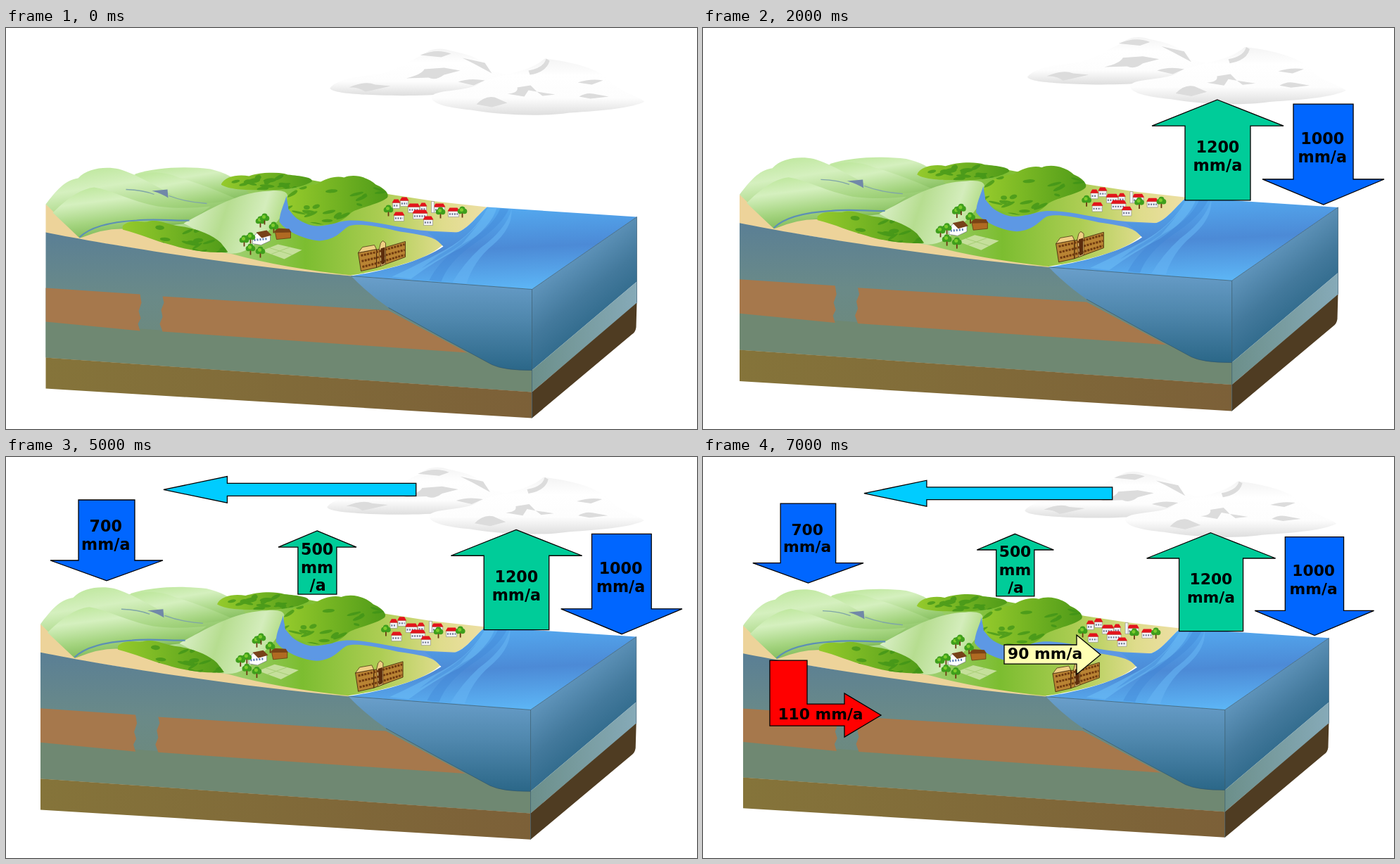
Recreate the animation shown at these times as an HTML page. Size 982 by 570 pixels, loop 8000 ms.

```html
<!DOCTYPE html>
<html lang="en">
<head>
<meta charset="utf-8">
<title>Water balance</title>
<style>
  html, body { margin: 0; width: 100%; height: 100%; overflow: hidden; background: #fff; }
  svg { display: block; width: 982px; height: 570px; }
  text { font: bold 22px Verdana, "DejaVu Sans", sans-serif; text-anchor: middle; }
  .arrow path { stroke: #000; stroke-width: 1.3; }
</style>
</head>
<body>
<svg viewBox="0 0 982 570">
<defs>
  <linearGradient id="slate" x2="0" y2="1"><stop stop-color="#5a7f95"/><stop offset=".4" stop-color="#6a8a88"/><stop offset="1" stop-color="#6f8872"/></linearGradient>
  <linearGradient id="base"><stop stop-color="#85743a"/><stop offset="1" stop-color="#7c6038"/></linearGradient>
  <linearGradient id="depth" x2="0" y2="1"><stop stop-color="#6a9fcb"/><stop offset=".45" stop-color="#5088ae"/><stop offset="1" stop-color="#2b6788"/></linearGradient>
  <linearGradient id="side" x1=".3" y1=".2" x2=".65" y2=".85"><stop stop-color="#6a9ec6"/><stop offset=".5" stop-color="#43799c"/><stop offset="1" stop-color="#236080"/></linearGradient>
  <linearGradient id="shelf"><stop stop-color="#6c8f8a"/><stop offset="1" stop-color="#86aab8"/></linearGradient>
  <linearGradient id="sea" x1=".45" x2=".6" y2="1"><stop stop-color="#54aaf0"/><stop offset=".5" stop-color="#4c8ad6"/><stop offset="1" stop-color="#5db6f6"/></linearGradient>
  <linearGradient id="plain"><stop stop-color="#b2dc98"/><stop offset=".2" stop-color="#9fd072"/><stop offset=".43" stop-color="#7cbd30"/><stop offset=".67" stop-color="#accd53"/><stop offset=".86" stop-color="#dfdc8c"/><stop offset="1" stop-color="#eedfa5"/></linearGradient>
  <linearGradient id="hill" x1=".25" x2=".65" y2="1"><stop stop-color="#c0e8a0"/><stop offset=".25" stop-color="#d5f0bf"/><stop offset=".6" stop-color="#a4d47f"/><stop offset="1" stop-color="#70ae48"/></linearGradient>
  <linearGradient id="slope" y2=".2"><stop stop-color="#e4f4d6"/><stop offset=".45" stop-color="#b6dd90"/><stop offset=".8" stop-color="#d4edbc"/><stop offset="1" stop-color="#b2dc86"/></linearGradient>
  <linearGradient id="wood"><stop stop-color="#96cb2c"/><stop offset="1" stop-color="#4e9a18"/></linearGradient>
  <linearGradient id="cloud" x2="0" y2="1"><stop stop-color="#f4f4f4"/><stop offset=".3" stop-color="#fff"/><stop offset=".7" stop-color="#fdfdfd"/><stop offset="1" stop-color="#dedede"/></linearGradient>
  <clipPath id="clip0"><path d="M165 281C175 271 190 276 200 275 215 270 230 279 245 281 265 283 292 292 305 305L315 318C290 320 260 316 235 308 210 302 190 292 165 286Z"/></clipPath>
  <clipPath id="clip1"><path d="M305 222C310 210 330 207 345 210 360 205 385 203 400 208 420 210 437 212 434 218 420 226 400 230 360 230 340 230 315 229 305 222Z"/></clipPath>
  <clipPath id="clip2"><path d="M399 240C405 230 425 222 440 222 455 212 470 209 480 212 495 206 515 212 525 222 535 226 546 235 541 241 530 250 500 255 490 262 480 272 468 280 450 279 430 278 408 268 401 257Z"/></clipPath>
</defs>
<g id="scene">
  <!-- clouds -->
  <path fill="url(#cloud)" d="M460 85C470 72 500 68 530 65 558 58 572 46 590 39 602 28 618 27 632 32 652 36 672 41 680 52 690 65 715 64 720 68L700 82C650 95 580 97 530 95 500 94 462 92 460 85Z"/>
  <path fill="url(#cloud)" d="M604 98C606 87 650 90 670 80 690 65 740 66 765 43 800 47 842 56 860 76 870 90 900 97 907 104 890 113 850 117 800 120 760 126 700 123 660 116 630 113 605 108 604 98Z"/>
  <path fill="#dcdcdc" d="M487 84Q510 74 524 80L546 82Q525 87 510 90 500 83 487 84ZM568 71Q590 66 594 58L622 56 645 60 622 66Q610 75 600 70ZM588 38Q612 28 632 36L618 41ZM642 76Q658 70 680 74L664 81ZM648 42L680 49 690 64 664 50ZM668 108Q680 95 694 98L712 106 690 112ZM712 93Q728 92 726 84L745 81 754 90 742 88 736 97ZM742 60Q764 56 767 43L772 46Q768 62 744 66ZM812 77Q830 71 848 74L832 80ZM814 97Q824 91 834 93L856 97 830 100ZM754 90L780 94 762 96Z"/>

  <!-- land -->
  <path fill="#edd39a" d="M56 250L104 290 250 270 490 350V353L330 336 103 300 56 291Z"/>
  <path fill="url(#plain)" d="M270 240L430 215 545 236 610 246 683 254C665 270 655 287 637 291L600 290 620 308C600 326 560 340 490 351 430 349 360 335 300 318L230 290Z"/>
  <g fill="url(#hill)">
    <path d="M183 207C215 197 255 196 290 200 315 206 330 215 345 235L330 262H200Z"/>
    <path d="M178 209C200 203 225 203 245 212 280 222 310 235 328 243L300 275 190 265Z"/>
    <path d="M56 250C70 232 82 216 102 213 115 199 140 196 160 200 185 207 215 226 255 247 282 250 300 248 320 244L265 276 104 297Z"/>
    <path d="M66 262C85 243 105 228 125 226 150 230 178 246 215 253 245 257 270 255 290 253L258 276 185 278 104 298Z"/>
  </g>
  <path fill="url(#slope)" d="M252 277C290 257 330 232 375 231 395 229 402 234 399 241 398 260 388 274 365 295 350 312 335 322 315 320L285 295Z"/>
  <path fill="none" stroke="#5d8fb5" stroke-width="2.2" d="M104 297C120 281 150 275 185 273 215 270 237 274 260 273"/>
  <path fill="none" stroke="#7fa5a8" stroke-width="1.3" d="M170 229Q195 230 210 236M231 238Q255 247 285 249"/>
  <path fill="#7188a8" d="M207 231L229 229 230 241Q221 235 207 231Z"/>
  <path fill="#edd39a" d="M108 297Q140 284 166 285L235 307 322 321Q390 340 490 351L420 347 330 336 200 316Z"/>
  <path fill="#5d98e4" d="M398 238C400 260 408 270 425 277 445 287 465 275 487 273 520 272 560 285 600 288L642 290 620 309C610 297 600 295 560 289 530 282 500 276 487 281 475 288 470 300 445 302 420 300 395 286 388 275 388 262 395 250 398 238Z"/>
  <g id="woods"></g>
  <path fill="#c5df9b" d="M363 316L386 307 420 315 395 328Z"/>
  <path fill="none" stroke="#a9cf78" d="M374 312L406 322M376 321L403 311"/>

  <!-- sea and block -->
  <path fill="url(#sea)" d="M490 352C540 344 590 331 621 310 608 296 600 292 598 289L637 291C655 287 665 270 683 254L896 268 747 371Z"/>
  <path fill="#6cbcf7" opacity=".6" d="M684 255Q665 292 625 314T548 353L575 356Q610 330 646 312 690 282 697 255Z"/>
  <path fill="#3f86d4" opacity=".4" d="M702 256Q690 285 650 306 615 330 601 358L618 360Q628 332 665 306 704 280 714 257ZM676 272Q650 303 615 322L590 341Q620 325 647 307Z"/>
  <path fill="#66b5f3" opacity=".6" d="M718 257Q710 286 674 312 650 334 634 361L654 363Q664 331 690 309 720 284 718 257Z"/>
  <path fill="url(#slate)" d="M56 290C140 307 330 338 490 352L747 371V517L56 468Z"/>
  <path fill="#6f8872" d="M56 417L655 461 747 470V517L56 468Z"/>
  <path fill="#a6784c" d="M56 369L190 378 192 390 188 402 191 412 187 420 190 430 56 417ZM222 381L543 401 655 461 222 431 218 420 222 410 220 400 224 390Z"/>
  <path fill="url(#depth)" d="M490 352L747 371V486C725 486 706 485 690 478L620 440 543 397Q515 378 490 352Z"/>
  <path fill="url(#base)" d="M56 468L747 517V554L56 512Z"/>
  <path fill="url(#side)" d="M747 371L896 268V360L747 486Z"/>
  <path fill="url(#shelf)" d="M747 486L896 360V391L747 517Z"/>
  <path fill="#4f3c22" d="M747 517L896 390 895 425Q894 432 889 435L747 554Z"/>
  <path fill="none" stroke="#2f5368" stroke-width=".8" opacity=".8" d="M490 352L747 371 896 268V390M747 371V554M543 397L620 440 690 478Q706 486 747 486"/>

  <g id="buildings"></g>
  <path fill="#b98333" stroke="#3e2108" stroke-width=".8" d="M500 319L526 314V340L504 345ZM526 315L567 303V325L526 340Z"/>
  <path fill="#efcf83" stroke="#3e2108" stroke-width=".7" d="M500 319L506 311 523 308 526 314ZM530 313L532 305 535 302 539 305V335L532 338Z"/>
  <path fill="none" stroke="#713b10" stroke-width="3" stroke-dasharray="3 1.4" d="M504 323L526 318 566 307M505 331L526 326 566 315M506 339L526 334 566 322"/>
  <path fill="#5c2d0d" d="M532 313L538 311V334L533 336Z"/>

  <g id="arrows"></g>
</g>
</svg>
<script>
const $ = id => document.getElementById(id);

let seed = 7;
const random = () => (seed = seed * 16807 % 2147483647) / 2147483647;
const between = (low, high) => low + random() * (high - low);

// Woods: a lit canopy with darker leaf strokes, clipped to its outline
function wood(clip, x, y, w, h, count) {
  let leaves = "";
  for (let i = 0; i < count; i++) {
    const cx = between(x, x + w), cy = between(y + h * .2, y + h);
    leaves += `<ellipse cx="${cx}" cy="${cy}" rx="${between(4, 11)}" ry="${between(1.5, 3.5)}" transform="rotate(${between(-35, 20)} ${cx} ${cy})"/>`;
  }
  return `<g clip-path="url(#clip${clip})"><rect x="${x}" y="${y}" width="${w}" height="${h}" fill="url(#wood)"/><g fill="#3c9217" opacity=".7">${leaves}</g></g>`;
}
$("woods").innerHTML = wood(1, 304, 203, 132, 28, 20) + wood(2, 396, 207, 148, 73, 32) + wood(0, 163, 270, 154, 50, 26);

const tree = ([x, y]) => `<path d="M${x} ${y}v9" stroke="#6b3a12" stroke-width="1.8"/>
  <g fill="#3f9f1c"><circle cx="${x - 3}" cy="${y}" r="3.8"/><circle cx="${x + 3}" cy="${y}" r="3.8"/><circle cx="${x}" cy="${y - 3}" r="4"/></g>
  <circle cx="${x - 1}" cy="${y - 2}" r="2.5" fill="#7ccc2c"/>`;

const house = ([x, y, w]) => `<path fill="#f4f4f8" stroke="#777" stroke-width=".5" d="M${x} ${y}h${w}v8h${-w}z"/>
  <path fill="#e3141c" d="M${x - 1} ${y}l3-5h${w - 4}l3 5z"/>
  <path stroke="#66708c" stroke-width="2.4" stroke-dasharray="1.8 1.7" d="M${x + 1.5} ${y + 4}h${w - 3}"/>`;

$("buildings").innerHTML =
  [[560, 245, 11], [549, 248, 10], [571, 254, 16], [588, 253, 9], [608, 254, 15], [551, 266, 14], [578, 263, 20], [628, 260, 15], [593, 272, 13]].map(house).join("") +
  `<path fill="#f4f4f8" stroke="#777" stroke-width=".5" d="M604 246h4v16h-4z"/>
   <path fill="#fff" stroke="#667" stroke-width=".6" d="M350 297L357 290 375 293V302L362 308 350 306Z"/>
   <path fill="#77421a" d="M355 290L370 287 377 294 363 298Z"/>
   <path stroke="#5878b0" stroke-width="3" stroke-dasharray="2 2" d="M352 301L372 299"/>
   <path fill="#b06a22" stroke="#5b300c" stroke-width=".7" d="M382 290L404 289V298L384 300Z"/>
   <path fill="#7a4315" d="M380 290L385 284 402 285 405 290Z"/>` +
  [[543, 258], [617, 261], [648, 260], [361, 274], [367, 270], [380, 282], [347, 297], [338, 301], [347, 313], [361, 317]].map(tree).join("");

// Each arrow: start time, fill, outline, then lines of text as [words, x, baseline]
const green = "#00cc99", blue = "#0066ff";
const arrows = [
  [1000, green, "M726.6 117L819.5 153.6H773V258.2H681.2V153.6H634.8Z", ["1200", 727, 191], ["mm/a", 727, 217]],
  [2000, blue, "M833.3 123H917.3V228.6H960.7L875.5 264.2 789.8 228.6H833.3Z", ["1000", 874, 179], ["mm/a", 874, 205]],
  [3000, "#00ccff", "M229.5 60.5L319.3 41.8V51.6H585.5V69.4H319.3V79.1Z"],
  [4000, blue, "M109.6 75H188.9V160.3H228.6L149.3 189 69.9 160.3H109.6Z", ["700", 148, 120], ["mm/a", 148, 145]],
  [5000, green, "M446 118.6L501.4 141.5H473.6V208H419V141.5H391.3Z", ["500", 446, 152], ["mm", 446, 178], ["/a", 447, 203]],
  [6000, "#ffffb3", "M430.4 277.7H534.3V263.6L568.6 291.8 534.3 320V305H430.4Z", ["90 mm/a", 489, 298]],
  [7000, "#ff0000", "M94.3 300H147.8V362.5H201.3V347.3L253.8 378.6 201.3 410V393.8H94.3Z", ["110 mm/a", 167, 385]]
];
$("arrows").innerHTML = arrows.map(([, fill, outline, ...lines]) =>
  `<g class="arrow"><path fill="${fill}" d="${outline}"/>${lines.map(([words, x, y]) => `<text x="${x}" y="${y}">${words}</text>`).join("")}</g>`).join("");

// Where the block's left edge and highest hill sit during each second, and its scale
const poses = [
  [56.5, 198.5, 1], [28, 177, 1.075], [52, 184, 1.0125], [29, 188, 1.018],
  [34.5, 187, 1.018], [49, 185, 1.008], [40.5, 189, 1.012], [57, 188, .991]
];

function draw(now) {
  const time = now % 8000;
  const [left, top, scale] = poses[Math.floor(time / 1000)];
  $("scene").setAttribute("transform", `translate(${left} ${top}) scale(${scale}) translate(-56 -198)`);
  [...$("arrows").children].forEach((arrow, i) => arrow.style.display = time < arrows[i][0] ? "none" : "");
  requestAnimationFrame(() => draw(performance.now()));
}
draw(performance.now());
</script>
</body>
</html>
```
